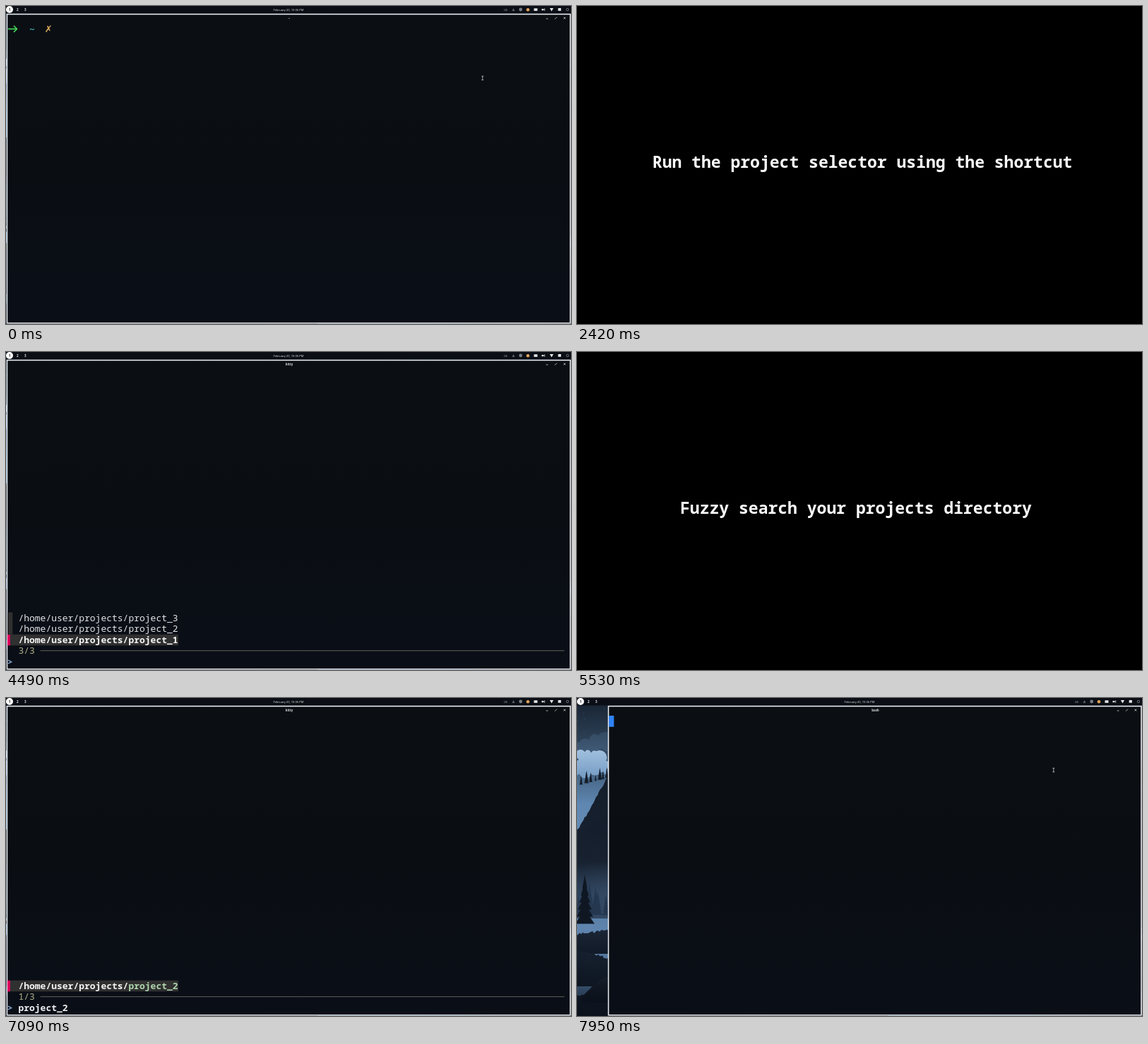
An HTML page with a canvas that plays this animation: 800 by 450 pixels, repeating every 8 s.

```html
<!DOCTYPE html>
<html lang="en">
<head>
<meta charset="utf-8">
<title>Project selector</title>
<style>
  html, body { margin: 0; width: 100%; height: 100%; overflow: hidden; background: #000; }
  canvas { display: block; width: 800px; height: 450px; }
</style>
</head>
<body>
<canvas id="stage" width="800" height="450"></canvas>
<script>
const LOOP = 8000, STEP = 172.8;
const MONO = '"Noto Sans Mono", "DejaVu Sans Mono", monospace';
const SANS = '"Noto Sans", "Open Sans", sans-serif';
const CELL = 7.8, ROW = 15.6;
const PROJECTS = [1, 2, 3].map(n => `/home/user/projects/project_${n}`);
const QUERY = 'project_2';

const screen = document.getElementById('stage').getContext('2d');
const wallpaper = document.createElement('canvas');
wallpaper.width = 800;
wallpaper.height = 450;
let c = wallpaper.getContext('2d');

let seed = 11;
function random() {
  seed = (seed * 16807) % 2147483647;
  return seed / 2147483647;
}

// ---- drawing helpers ----
function rect(x, y, w, h, fill) {
  c.fillStyle = fill;
  c.fillRect(x, y, w, h);
}
function disc(x, y, r, fill) {
  c.fillStyle = fill;
  c.beginPath();
  c.arc(x, y, r, 0, 7);
  c.fill();
}
function line(x0, y0, x1, y1, stroke, width = 0.8) {
  c.strokeStyle = stroke;
  c.lineWidth = width;
  c.beginPath();
  c.moveTo(x0, y0);
  c.lineTo(x1, y1);
  c.stroke();
}
// Isosceles triangle with its tip at (x, y); a negative h points it down.
function wedge(x, y, halfWidth, h, fill) {
  c.fillStyle = fill;
  c.beginPath();
  c.moveTo(x, y);
  c.lineTo(x + halfWidth, y + h);
  c.lineTo(x - halfWidth, y + h);
  c.fill();
}
function text(str, x, y, font, fill, align = 'left') {
  c.font = font;
  c.fillStyle = fill;
  c.textAlign = align;
  c.fillText(str, x, y);
}
function fade(y0, y1, ...colors) {
  const g = c.createLinearGradient(0, y0, 0, y1);
  colors.forEach((color, i) => g.addColorStop(i / Math.max(1, colors.length - 1), color));
  return g;
}

// ---- wallpaper ----
// A rough slope rising to (x, top); power below 1 makes cliffs and boulders.
function hill(x, top, left, right, base, colors, power = 1, rough = 4) {
  c.fillStyle = fade(top, base, ...colors);
  c.beginPath();
  c.moveTo(x - left, base);
  for (let px = x - left; px <= x + right; px += 2) {
    const u = 1 - Math.abs(px - x) / (px < x ? left : right);
    const jitter = (random() - 0.5) * rough * Math.min(1, u * 8);
    c.lineTo(px, base - (base - top) * u ** power + jitter);
  }
  c.lineTo(x + right, base);
  c.fill();
}
function haze(x, y, rx, ry, rgb, alpha) {
  c.save();
  c.translate(x, y);
  c.scale(rx, ry);
  const g = c.createRadialGradient(0, 0, 0, 0, 0, 1);
  g.addColorStop(0, `rgba(${rgb},${alpha})`);
  g.addColorStop(1, `rgba(${rgb},0)`);
  disc(0, 0, 1, g);
  c.restore();
}
function cloud(x, y, w, h, top, bottom) {
  const fill = fade(y - h, y + h * 0.3, top, bottom);
  for (let i = 0; i < 40; i++) {
    const u = random() * 2 - 1;
    disc(x + u * w / 2, y - random() * h * (1 - u * u) * 0.8, h * (0.1 + 0.16 * random()), fill);
  }
}
function pine(x, base, h, fill) {
  for (let i = 0; i < 6; i++) wedge(x, base - h + h * i / 7, h * (0.05 + 0.03 * i), h * 0.28, fill);
}
function pines(x0, y0, x1, y1, count, h, fill) {
  for (let i = 0; i < count; i++) {
    const u = (i + random() * 0.6) / count;
    pine(x0 + (x1 - x0) * u, y0 + (y1 - y0) * u, h * (0.6 + 0.7 * random()), fill);
  }
}
function rock(x, base, w, h) {
  haze(x, base + h * 0.2, w * 0.6, h * 0.5, '15,24,38', 0.8);
  hill(x, base - h, w / 2, w / 2, base, ['#19222f', '#0b111a'], 0.6, 3);
}
function paintSky() {
  rect(0, 0, 800, 450, fade(0, 300, '#162130', '#32485f', '#5f87b1', '#688fb8', '#668db6'));
  haze(620, 40, 330, 130, '32,46,65', 0.9);
  for (let i = 0; i < 60; i++) rect(random() * 800, 12 + random() * 45, 0.8, 0.8, 'rgba(180,205,230,.4)');
  for (let i = 0; i < 7; i++) cloud(60 + i * 105, 72 + i % 3 * 10, 120, 34, '#31465d', '#425c7a');
  for (const x of [20, 105, 310, 375]) cloud(x, 108, 75, 42, '#a9c7e3', '#6c94be');
}
function paintMountains() {
  const clear = 'rgba(97,136,177,0)';
  hill(345, 114, 75, 90, 180, ['#9dbcda', '#658cb5']);
  hill(205, 77, 130, 200, 215, ['#3c5676', '#46658a', '#668db6']);
  hill(204, 77, 100, 16, 150, ['#9ab8d7', clear], 1, 8);
  hill(522, 55, 210, 270, 205, ['#25364a', '#374f6b', '#5f82a8']);
  hill(521, 56, 100, 8, 145, ['rgba(115,145,180,.7)', clear], 1, 8);
  hill(506, 125, 32, 60, 158, ['#5c7a9e', clear]);
  for (let i = 0; i < 9; i++) {
    cloud(180 + i * 28, 187 + i * 4, 60, 28, '#8eafd1', '#688fb8');
    cloud(400 + i * 29, 214 - i * 9, 65, 38, '#6887a8', '#56779c');
  }
  haze(370, 235, 210, 60, '108,148,190', 0.9);
  hill(280, 200, 80, 150, 270, ['#4b6d94', '#5f87b0']);
  hill(115, 150, 60, 310, 298, ['#2f455e', '#3d5a7c', '#50739b']);
  hill(720, 118, 370, 200, 298, ['#2a3d54', '#304761', '#476689'], 1, 6);
  pines(400, 268, 640, 160, 50, 9, '#2e435c');
}
function paintShores() {
  rect(0, 298, 800, 152, fade(298, 450, '#6890b9', '#587ca5', '#4c6d93', '#2b3f58'));
  haze(360, 375, 170, 55, '98,136,177', 0.8);
  haze(740, 370, 230, 60, '28,42,60', 0.9);

  hill(45, 108, 150, 260, 312, ['#141d2a', '#17212f', '#2f445d'], 1.4);
  hill(95, 143, 110, 52, 312, ['#141d2a', '#17212f', '#2f445d'], 0.22);
  pines(4, 123, 48, 112, 7, 14, '#131c29');
  pines(145, 250, 290, 304, 22, 20, '#1f2e42');
  haze(75, 280, 150, 50, '62,88,120', 0.7);
  pines(0, 305, 110, 312, 15, 36, '#253850');

  hill(735, 52, 135, 200, 322, ['#141d2a', '#1a2535', '#263a52'], 0.35, 6);
  hill(605, 198, 65, 90, 315, ['#17212f', '#1d2a3c'], 0.5);
  pines(580, 212, 615, 205, 5, 16, '#131c29');
  hill(522, 248, 38, 50, 312, ['#17212f', '#1f2d40'], 0.3);
  hill(732, 158, 255, 70, 314, ['#9bb8d5', '#7191b5'], 1.3, 7);
  hill(742, 165, 225, 220, 325, ['#161f2d', '#1a2535', '#22334a'], 1.25, 9);
  haze(700, 295, 140, 35, '52,74,102', 0.6);
  pines(650, 318, 800, 308, 17, 30, '#1d2c40');
  pine(788, 302, 64, '#121b28');
  hill(600, 292, 45, 45, 325, ['#7f9dbd', '#182434', '#182434'], 0.5);
  hill(450, 292, 85, 130, 316, ['#1a2636', '#1a2636'], 0.5);
  hill(730, 328, 95, 110, 344, ['#9ab6d2', '#5f7d9f'], 0.4);
  hill(805, 370, 65, 40, 415, ['#121b28', '#0f1722']);

  pine(11, 320, 70, '#0f1723');
  pine(52, 325, 40, '#121c2a');
  hill(130, 319, 220, 215, 362, ['#1c2839', '#111a27'], 0.5);
  hill(-20, 350, 40, 200, 408, ['#162130', '#101824']);
  hill(100, 406, 150, 260, 450, ['#121b29', '#0d141e'], 0.4);
}
function paintForeground() {
  for (let i = 0; i < 30; i++) {
    const x = 210 + random() * 560, y = 305 + random() * 115;
    line(x, y, x + 15 + random() * 35, y, 'rgba(133,166,201,.25)');
  }
  const rocks = [[285, 335, 132, 25], [360, 341, 38, 19], [285, 363, 110, 22], [45, 431, 78, 39],
    [257, 423, 108, 45], [327, 421, 38, 16], [400, 452, 85, 20],
    [498, 390, 90, 22], [562, 407, 66, 44], [636, 410, 92, 32]];
  rocks.forEach(r => rock(...r));
  haze(800, 450, 220, 70, '10,16,26', 0.6);
  haze(0, 450, 240, 80, '10,16,26', 0.6);
}

// ---- desktop ----
function topBar() {
  rect(0, 0, 800, 10.5, '#0b0f15');
  disc(5, 5, 5, '#fff');
  ['#111', '#e4e7ea', '#e4e7ea'].forEach((fill, i) =>
    text(i + 1, 5 + i * 11.2, 6.7, `600 4.6px ${SANS}`, fill, 'center'));
  text('February 20, 10:36 PM', 400, 6.6, `500 4.1px ${SANS}`, '#dfe3e6', 'center');
  text('us', 707.5, 6.5, `4.4px ${SANS}`, '#9ba1a8', 'center');
  wedge(718.5, 3, 2, 4, '#59616b');
  disc(728.7, 5, 2.4, '#757c84');
  disc(739, 5.2, 2.3, '#e2a35c');
  rect(747.5, 3.3, 5, 3.6, '#e2e5e8');
  rect(758.5, 4, 3, 2.2, '#e8ebee');
  line(762.7, 3.4, 762.7, 6.8, '#e8ebee');
  wedge(772.5, 7.4, 2.6, -4.4, '#eef0f2');
  rect(781.7, 3, 4.2, 3.8, '#e2e5e8');
  disc(795, 5, 2, '#83898f');
  disc(795, 5, 1.3, '#0b0f15');
}
function appWindow(x, title, alpha = 1) {
  const ink = '#d5d9dc';
  c.save();
  c.globalAlpha = alpha;
  rect(x, 11.5, 799 - x, 437.2, fade(11, 449, '#0b0f13', '#0a0e13', '#0a0e17'));
  c.strokeStyle = '#edf1f4';
  c.lineWidth = 1.5;
  c.strokeRect(x, 11.6, 799 - x, 437.1);
  text(title, (x + 799) / 2 + 0.7, 18.6, `600 4.4px ${SANS}`, ink, 'center');
  line(764.8, 18, 767.4, 18, ink);
  line(777, 18.7, 780, 15.7, ink);
  line(789.6, 15.8, 792.2, 18.4, ink);
  line(792.2, 15.8, 789.6, 18.4, ink);
  c.restore();
}
function pointer() {
  for (const y of [99.3, 104.7]) line(673.4, y, 676.2, y, '#ccd0d3');
  line(674.8, 99.3, 674.8, 104.7, '#ccd0d3');
}
function shell(cursorOn) {
  const green = '#45d35a';
  appWindow(1.5, '~');
  line(3, 32.5, 15.5, 32.5, green, 1.7);
  line(11, 28, 15.8, 32.8, green, 1.7);
  line(11, 37, 15.8, 32.2, green, 1.7);
  text('~', 33, 37, `bold 13px ${MONO}`, '#3fc6cc');
  text('✗', 60.3, 37, '13px "DejaVu Sans", sans-serif', '#e0ad5c', 'center');
  if (cursorOn) rect(71.8, 24.8, 1.4, 15.8, '#e6e9ec');
  pointer();
}
function finder(query) {
  const left = 17.4;
  const matches = PROJECTS.filter(path => path.includes(query));
  appWindow(1.5, 'kitty');
  matches.forEach((path, i) => {
    const top = 399.7 - i * ROW, selected = i === 0;
    const font = `${selected ? 'bold ' : ''}13px ${MONO}`;
    const start = path.indexOf(query), end = start + query.length;
    rect(2, top, selected ? 242 : 7.3, ROW, '#303030');
    if (selected) rect(2, top, 3.9, ROW, '#e0005f');
    [...path].forEach((letter, k) => {
      const found = k >= start && k < end;
      const fill = selected ? (found ? '#afd7af' : '#f4f4f4') : (found ? '#87af87' : '#e2e5e7');
      text(letter, left + k * CELL, top + 12, font, fill);
    });
  });
  text(`${matches.length}/3`, left, 427.3, `13px ${MONO}`, '#afaf87');
  line(48.5, 422.7, 790.5, 422.7, '#626359', 1);
  text('>', 1.8, 442.8, `bold 13px ${MONO}`, '#87afd7');
  text(query, left, 442.8, `bold 13px ${MONO}`, '#eef0f2');
}
function caption(str, x) {
  rect(0, 0, 800, 450, '#000');
  text(str, x, 229.3, `600 23.05px ${MONO}`, '#fafafa');
}
// Fades in on the right half while its left edge slides across.
function newWindow(progress) {
  const x = 400.5 - 356 * progress, alpha = Math.min(1, 0.18 + 1.5 * progress);
  appWindow(x, 'bash', alpha);
  c.globalAlpha = alpha;
  rect(x + 0.6, 25, 7.2, 15.8, '#2f82f5');
  c.globalAlpha = 1;
  pointer();
}

function render(time) {
  const tick = Math.floor((time % LOOP + 6) / STEP);
  if (tick >= 9 && tick < 16) return caption('Run the project selector using the shortcut', 106.8);
  if (tick >= 27 && tick < 34) return caption('Fuzzy search your projects directory', 146);

  c.drawImage(wallpaper, 0, 0);
  topBar();
  if (tick < 9) shell(tick % 4 > 1);
  else if (tick < 20) shell(true);
  else if (tick < 43) {
    const typed = Math.max(0, tick - 34) / 7 * QUERY.length;
    finder(QUERY.slice(0, Math.round(typed)));
  }
  else if (tick > 43) newWindow((tick - 44) / 2);
}

paintSky();
paintMountains();
paintShores();
paintForeground();
c = screen;
const start = performance.now();
(function play() {
  render(performance.now() - start);
  requestAnimationFrame(play);
})();
</script>
</body>
</html>
```
